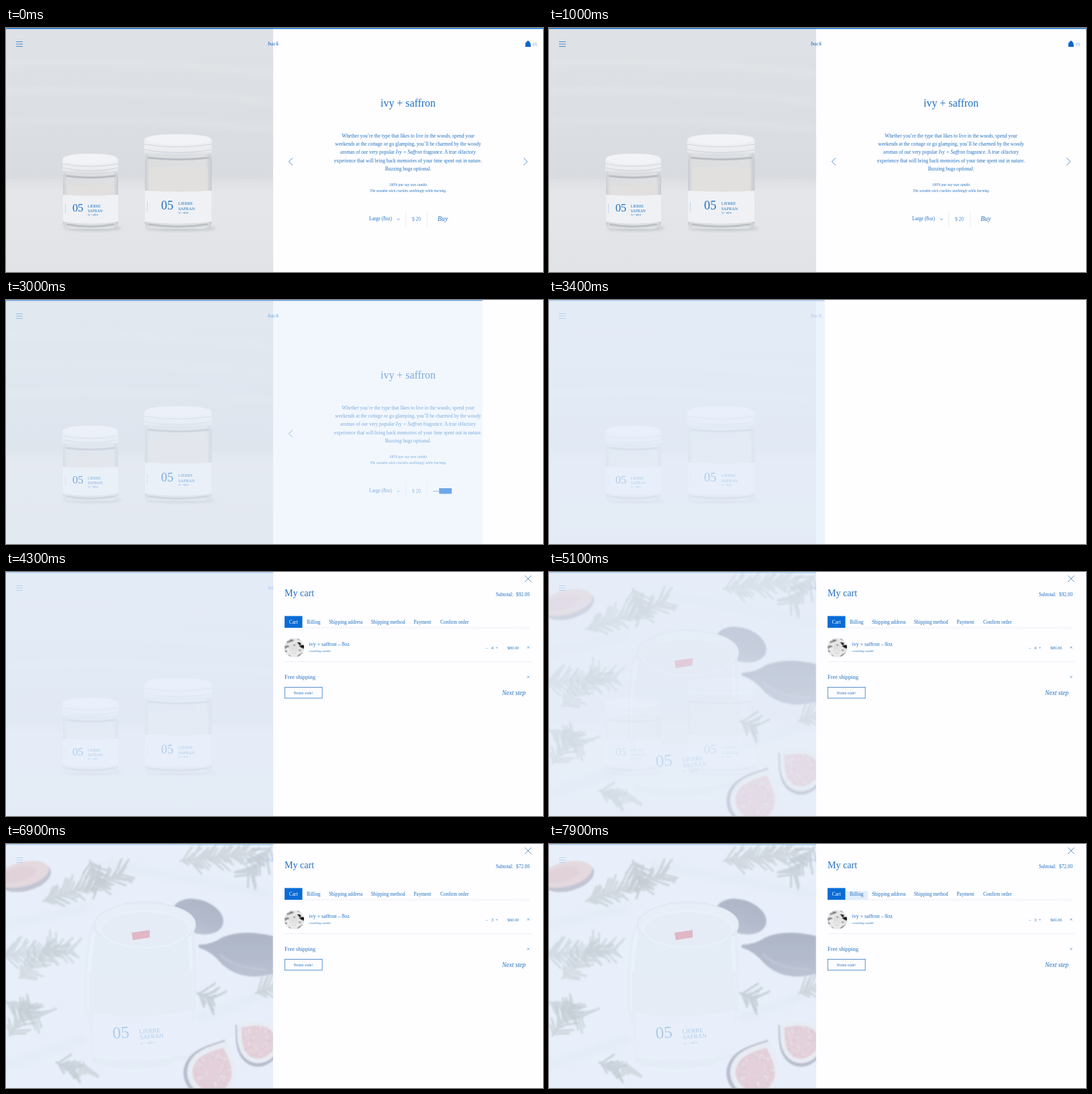
These frames come from a looping animation (800 px wide and 363 px high, 8000 ms). An HTML page:

```html
<!DOCTYPE html>
<html lang="en">
<head>
<meta charset="utf-8">
<title>Candle shop</title>
<style>
html, body { margin: 0; width: 100%; height: 100%; overflow: hidden; background: #fefdff; }
svg { display: block; width: 800px; height: 363px; }
text { font-family: "Liberation Serif", "Times New Roman", serif; fill: #1f70bf; }
.it { font-style: italic; }
.mid { text-anchor: middle; }
.end { text-anchor: end; }
.line { fill: none; stroke: #2f7ac2; stroke-width: .8; }
.dots { fill: none; stroke: #d2dae4; stroke-width: .8; stroke-dasharray: 1.5 1.5; }
</style>
</head>
<body>
<svg viewBox="0 0 800 363">
  <defs>
    <linearGradient id="wall" x2="0" y2="1">
      <stop offset="0" stop-color="#dfe2e6"/><stop offset="1" stop-color="#d8dbe0"/>
    </linearGradient>
    <linearGradient id="table" x2="0" y2="1">
      <stop offset="0" stop-color="#dddee2"/><stop offset=".15" stop-color="#e5e6e9"/><stop offset="1" stop-color="#e1e3e6"/>
    </linearGradient>
    <linearGradient id="glass">
      <stop offset="0" stop-color="#c9ccd1"/><stop offset=".06" stop-color="#dcdddf"/>
      <stop offset=".9" stop-color="#dfe0e1"/><stop offset="1" stop-color="#c6cacf"/>
    </linearGradient>
    <linearGradient id="lid" x2="0" y2="1">
      <stop offset="0" stop-color="#f1f2f5"/><stop offset=".75" stop-color="#eaecef"/><stop offset="1" stop-color="#d6d9de"/>
    </linearGradient>
    <linearGradient id="skin" x2="0" y2="1">
      <stop offset="0" stop-color="#20253f"/><stop offset=".6" stop-color="#343750"/><stop offset="1" stop-color="#55566c"/>
    </linearGradient>
    <filter id="soft" x="-30%" y="-30%" width="160%" height="160%"><feGaussianBlur stdDeviation="2"/></filter>
    <filter id="slight" x="-10%" y="-10%" width="120%" height="120%"><feGaussianBlur stdDeviation="1"/></filter>
    <filter id="haze" x="-30%" y="-30%" width="160%" height="160%"><feGaussianBlur stdDeviation="5"/></filter>
    <clipPath id="half"><rect width="398" height="363"/></clipPath>
    <clipPath id="round"><circle cx="429.5" cy="112.5" r="14.5"/></clipPath>
    <clipPath id="buyClip"><rect id="buyBox" y="270" width="60" height="30"/></clipPath>
    <clipPath id="arrowClip"><rect id="arrowBox" x="630" y="270" height="30"/></clipPath>

    <g id="scene">
      <rect width="398" height="363" fill="#eff0f2"/>
      <path d="M0 120L120 95M150 30L398 75M0 330L120 290M285 260L398 220" stroke="#dfe2e6" stroke-width="12" filter="url(#haze)"/>
      <g id="leaves" fill="none" stroke-width="3.2" stroke-linecap="round" filter="url(#slight)"/>
      <g filter="url(#slight)">
        <ellipse cx="28" cy="49" rx="40" ry="21" transform="rotate(-14 28 49)" fill="#6b5a6c"/>
        <ellipse cx="25" cy="45" rx="40" ry="18" transform="rotate(-14 25 45)" fill="#e3a093"/>
        <ellipse cx="18" cy="46" rx="28" ry="11" transform="rotate(-14 18 46)" fill="#d88a83"/>
        <ellipse cx="286" cy="108" rx="39" ry="25" transform="rotate(18 286 108)" fill="url(#skin)"/>
        <path d="M287 150Q309 149 322 139Q352 126 398 137V193Q352 206 322 179Q307 160 287 154Z" fill="url(#skin)"/>
        <path d="M318 164Q342 186 388 187" fill="none" stroke="#666a83" stroke-width="4" opacity=".6"/>
      </g>
      <path d="M117 250Q113 130 138 106Q207 62 276 106Q286 140 282 245Q276 262 276 316Q200 348 128 325Q130 270 117 250Z" fill="#e3e4e7"/>
      <path d="M131 130Q120 190 124 248M272 126Q279 190 275 244" fill="none" stroke="#f5f6f8" stroke-width="5"/>
      <ellipse cx="207" cy="120" rx="75" ry="33" fill="#ececed" stroke="#d3d8de" stroke-width="2"/>
      <ellipse cx="207" cy="127" rx="66" ry="27" fill="#e6e4e4" stroke="#f7f7f7" stroke-width="2"/>
      <path d="M187 132L214 128V139L189 143Z" fill="#d62436"/>
      <path d="M124 190Q200 212 278 186V248Q200 264 124 250Z" fill="#eae7e5"/>
      <path d="M129 251Q200 265 277 246V311Q200 331 129 317Z" fill="#eff1f4"/>
      <g transform="rotate(-4 198 284)">
        <text x="159" y="287" font-size="25">05</text>
        <text x="199" y="282" font-size="8.8">LIERRE</text>
        <text x="199" y="290.5" font-size="9">SAFRAN</text>
        <text class="it" x="199" y="298" font-size="4.3">ivy + saffron</text>
      </g>
      <g id="halves" filter="url(#slight)"/>
    </g>
  </defs>

  <g id="page">
    <g clip-path="url(#half)">
      <rect width="398" height="228" fill="url(#wall)"/>
      <rect y="224" width="398" height="139" fill="url(#table)"/>
      <path d="M0 52Q180 44 398 68M0 94Q200 88 398 110M0 140Q160 130 398 150" fill="none" stroke="#e4e6e9" stroke-width="5" filter="url(#haze)"/>
      <g id="jars"/>
      <use id="swap" href="#scene" opacity="0"/>
    </g>
    <rect width="800" height="1.4" fill="#0f6fd6"/>
    <path class="line" d="M15 20.5H25M15 24H25M15 27.5H25"/>
    <text class="it" x="390" y="26.3" font-size="8.6">back</text>
    <path d="M774 21.5H781L782 28H773.5Z" fill="#0a64cc"/>
    <path d="M776 22V20.3Q777.7 18.4 779.4 20.3V22" fill="#0a64cc" stroke="#0a64cc" stroke-width=".8"/>
    <text x="784.8" y="26" font-size="5.3" opacity=".8">(3)</text>
    <text class="mid" x="599" y="117" font-size="15.9">ivy + saffron</text>
    <g id="blurb" class="mid" font-size="7.42"></g>
    <g class="mid it" font-size="5.45">
      <text x="599.5" y="235">100% pur soy wax candle.</text>
      <text x="599.3" y="244">The wooden wick crackles soothingly while burning.</text>
    </g>
    <path class="line" d="M427 193.3L421.3 198.7L427 204.2M771 193.3L776.7 198.7L771 204.2"/>
    <text x="541" y="286.4" font-size="7.25">Large (8oz)</text>
    <path class="line" d="M582.7 283.8L584.5 285.5L586.3 283.8"/>
    <path class="dots" d="M595.5 273V295M627.5 273V295"/>
    <text x="605" y="286.6" font-size="7.4" opacity=".8">$ 20</text>
    <g clip-path="url(#buyClip)"><text class="it" x="643" y="287.3" font-size="9.8">Buy</text></g>
    <path clip-path="url(#arrowClip)" class="line" d="M636 284.5H660M656.5 281.5L660 284.5L656.5 287.5"/>
    <rect id="block" y="280" height="8.3" fill="#0a69d7"/>
  </g>

  <rect id="veil" width="800" height="363" fill="#e5effc" opacity="0"/>
  <rect id="panel" width="402" height="363" fill="#fefdff"/>

  <g id="cart">
    <g>
      <path class="line" d="M773 5.3L782.5 14.8M782.5 5.3L773 14.8"/>
      <text x="415" y="36" font-size="14.1">My cart</text>
      <text x="729.7" y="36.3" font-size="7.25">Subtotal:</text>
      <text id="total" class="end" x="780" y="36.3" font-size="7.25"></text>
    </g>
    <g>
      <path class="dots" d="M415 83H781"/>
      <rect id="hover" x="442" width="33" fill="#e1eefa"/>
      <rect x="415" y="65.5" width="26.5" height="17.5" fill="#0a6cd6"/>
      <g id="tabs" font-size="7.4"></g>
    </g>
    <g>
      <g clip-path="url(#round)"><use href="#scene" transform="translate(413.5 98) scale(.08)" style="filter:grayscale(.85) brightness(.88) contrast(1.3)"/></g>
      <text x="451.5" y="110" font-size="7.95">ivy + saffron – 8oz</text>
      <text class="it" x="451.5" y="119" font-size="4.8">crackling candle</text>
      <g class="mid" font-size="6.6">
        <text x="716.5" y="114.5">–</text>
        <text id="count" x="724.3" y="114.8"></text>
        <text x="731" y="114.8">+</text>
        <text x="778" y="115" font-size="8">×</text>
      </g>
      <text id="price" class="end" x="764" y="114.8" font-size="6.2"></text>
      <path class="dots" d="M415 133.3H783"/>
    </g>
    <g>
      <text x="415" y="159" font-size="8.4">Free shipping</text>
      <text class="mid" x="778" y="158.9" font-size="8">×</text>
    </g>
    <g>
      <rect class="line" x="415.3" y="171.4" width="55.8" height="16.4"/>
      <text class="mid" x="443" y="181.7" font-size="5.45">Promo code!</text>
      <text class="it" x="739" y="183" font-size="9.5">Next step</text>
    </g>
  </g>
</svg>

<script>
const LOOP = 8000, STEP = 100;
const $ = id => document.getElementById(id);
const set = (id, attrs) => {
  for (const k in attrs) $(id).setAttribute(k, attrs[k]);
};
const ramp = (t, a, b) => Math.min(1, Math.max(0, (t - a) / (b - a)));
const easeOut = u => 1 - (1 - u) ** 2;
const easeBoth = u => (1 - Math.cos(Math.PI * u)) / 2;

let seed = 7;
const rand = () => (seed = seed * 16807 % 2147483647) / 2147483647;

$('blurb').innerHTML = [
  'Whether you’re the type that likes to live in the woods, spend your',
  'weekends at the cottage or go glamping, you’ll be charmed by the woody',
  'aromas of our very popular <tspan class="it">Ivy + Saffron</tspan> fragrance. A true olfactory',
  'experience that will bring back memories of your time spent out in nature.',
  'Buzzing bugs optional.'
].map((s, i) => `<text x="599" y="${162.6 + i * 12.3}">${s}</text>`).join('');

$('tabs').innerHTML = [
  ['Cart', 421.8], ['Billing', 448], ['Shipping address', 481],
  ['Shipping method', 543.7], ['Payment', 607.5], ['Confirm order', 647]
].map(([s, x], i) => `<text x="${x}" y="76.8"${i ? '' : ' style="fill:#fff"'}>${s}</text>`).join('');

// Glass jar with a screw lid and a wrapped label.
function jar({ x, w, top, rim, label, foot, size, inset }) {
  const mid = x + w / 2, r = x + w, base = label + size * 1.56;
  const num = x + w * .18 + inset, name = x + w * .455 + inset * .7;
  const end = foot - 11;
  return `
    <ellipse cx="${mid + 4}" cy="${foot - 1}" rx="${w * .52}" ry="4" fill="#c3c6cb" filter="url(#soft)"/>
    <path d="M${x + 3} ${rim - 3}H${r - 2}Q${r + 1} ${rim + 6} ${r} ${rim + 14}V${foot - 9}Q${r - 2} ${foot} ${r - 14} ${foot}
      H${x + 14}Q${x + 1} ${foot} ${x + 1} ${foot - 9}V${rim + 12}Q${x + 1} ${rim + 3} ${x + 3} ${rim - 3}Z" fill="url(#glass)"/>
    <path d="M${x + 5} ${rim + 3}Q${mid} ${rim + 8} ${r - 4} ${rim + 3}" fill="none" stroke="#babec4" stroke-width="3"/>
    <path d="M${x + 7} ${rim + 17}H${r - 6}V${foot - 8}H${x + 7}Z" fill="#e1e0df"/>
    <path d="M${x + 6} ${foot - 7}Q${mid} ${foot} ${r - 6} ${foot - 7}" fill="none" stroke="#bcc1c7" stroke-width="3"/>
    <path d="M${x + 1} ${label}Q${mid} ${label + 3} ${r} ${label}V${end}Q${mid} ${end + 6} ${x + 1} ${end}Z" fill="#eff1f4"/>
    <path d="M${x} ${top + 9}Q${x} ${top} ${mid} ${top}T${r} ${top + 9}V${rim - 4}Q${mid} ${rim + 5} ${x} ${rim - 4}Z" fill="url(#lid)"/>
    <ellipse cx="${mid}" cy="${top + 8}" rx="${w / 2 - 2}" ry="7.5" fill="#f2f3f6"/>
    <path d="M${x} ${top + 15}Q${mid} ${top + 23} ${r} ${top + 15}M${x} ${rim - 9}Q${mid} ${rim} ${r} ${rim - 9}" fill="none" stroke="#d0d4da" stroke-width="1"/>
    <text x="${num}" y="${base}" font-size="${size}">05</text>
    <text x="${name}" y="${base - size * .39}" font-size="${size * .34}">LIERRE</text>
    <text x="${name}" y="${base + 1}" font-size="${size * .345}">SAFRAN</text>
    <text class="it" x="${name}" y="${base + 6}" font-size="3">ivy + saffron</text>
    <text transform="translate(${x + 5} ${base + 2}) rotate(-90)" font-size="2.8" opacity=".6">hand poured</text>`;
}
$('jars').innerHTML =
  jar({ x: 84, w: 83, top: 187, rim: 217, label: 248, foot: 299, size: 16.3, inset: 0 }) +
  jar({ x: 206, w: 100.5, top: 158, rim: 190, label: 242, foot: 299, size: 18.2, inset: 7 });

// Evergreen sprigs: x, y, length, angle.
function sprig([x, y, len, deg]) {
  const a = deg * Math.PI / 180, dx = Math.cos(a), dy = Math.sin(a);
  let d = `M${x} ${y}l${len * dx} ${len * dy}`;
  for (let s = 3; s < len; s += 5) {
    for (const side of [-1, 1]) {
      const b = a + side * (.5 + rand() * .5), n = 10 + rand() * 20;
      d += `M${x + s * dx} ${y + s * dy}l${n * Math.cos(b)} ${n * Math.sin(b)}`;
    }
  }
  const tone = rand() < .5 ? '#6a6c5c' : '#5c6560';
  return `<path d="${d}" stroke="${tone}" opacity="${.5 + rand() * .3}"/>`;
}
$('leaves').innerHTML = [
  [55, 85, 75, -18], [125, 25, 40, 70], [130, 60, 45, -20], [260, 25, 110, -6], [395, 5, 55, 130],
  [-5, 165, 105, -4], [20, 200, 75, -42], [0, 235, 55, 25], [5, 285, 55, -55],
  [75, 325, 30, 20], [115, 325, 18, 80], [285, 222, 25, 20], [372, 222, 25, -20]
].map(sprig).join('');

// Halved fruit: dark skin, pale rind, seeded flesh, pointed at the stem.
function fruit(x, y, r, turn) {
  const drop = k => `M0 ${-1.35 * r * k}C${.35 * r * k} ${-r * k} ${r * k} ${-.6 * r * k} ${r * k} ${.1 * r * k}` +
    `A${r * k} ${.9 * r * k} 0 0 1 ${-r * k} ${.1 * r * k}C${-r * k} ${-.6 * r * k} ${-.35 * r * k} ${-r * k} 0 ${-1.35 * r * k}Z`;
  let seeds = '';
  for (let i = 0; i < 70; i++) {
    const a = rand() * 6.283, s = (.25 + rand() * .5) * r;
    const cx = s * Math.cos(a), cy = s * Math.sin(a);
    seeds += `<path d="M${cx} ${cy}L${cx * 1.12} ${cy * 1.12}" stroke="${i % 2 ? '#c0505a' : '#f1cfc4'}" stroke-width="2.2"/>`;
  }
  return `<g transform="translate(${x} ${y}) rotate(${turn})">
    <path d="${drop(1.06)}" transform="translate(-3 2)" fill="#453a52"/>
    <path d="${drop(1)}" fill="#f1e6df"/>
    <path d="${drop(.8)}" fill="#de8380"/>${seeds}</g>`;
}
$('halves').innerHTML = fruit(376, 294, 31, -50) + fruit(308, 339, 37, 24);

function draw(t) {
  // Buy button wipe: in on hover, back out after the click.
  const L = 636, W = 28, R = L + W;
  const leaving = t >= 2800;
  const x0 = leaving ? R - W * ramp(t, 2800, 3100) : L + W * ramp(t, 2250, 2550);
  const x1 = leaving ? R - W * ramp(t, 3100, 3400) : L + W * ramp(t, 1895, 2190);
  set('block', { x: x0, width: Math.max(0, x1 - x0) });
  set('buyBox', { x: x0 });
  set('arrowBox', { width: x0 - 630 });

  set('veil', { opacity: .72 * easeOut(ramp(t, 2800, 3300)) });
  set('panel', { x: 800 - 402 * easeBoth(ramp(t, 2780, 3480)) });
  set('swap', { opacity: easeBoth(ramp(t, 4600, 5500)) });

  [...$('cart').children].forEach((row, i) => {
    const u = easeOut(ramp(t, 3450 + i * 90, 3800 + i * 90));
    row.setAttribute('opacity', u);
    row.setAttribute('transform', `translate(0 ${6 * (1 - u)})`);
  });

  const n = t < 6800 ? 4 : 3;
  $('count').textContent = n;
  $('price').textContent = `$${n * 20}.00`;
  $('total').textContent = `$${n * 20 + 12}.00`;

  const h = 17.5 * ramp(t, 7760, 7950);
  set('hover', { y: 83 - h, height: h });
}

const start = performance.now();
function tick() {
  const t = (performance.now() - start) % LOOP;
  draw(Math.floor(t / STEP) * STEP);
  requestAnimationFrame(tick);
}
tick();
</script>
</body>
</html>
```
